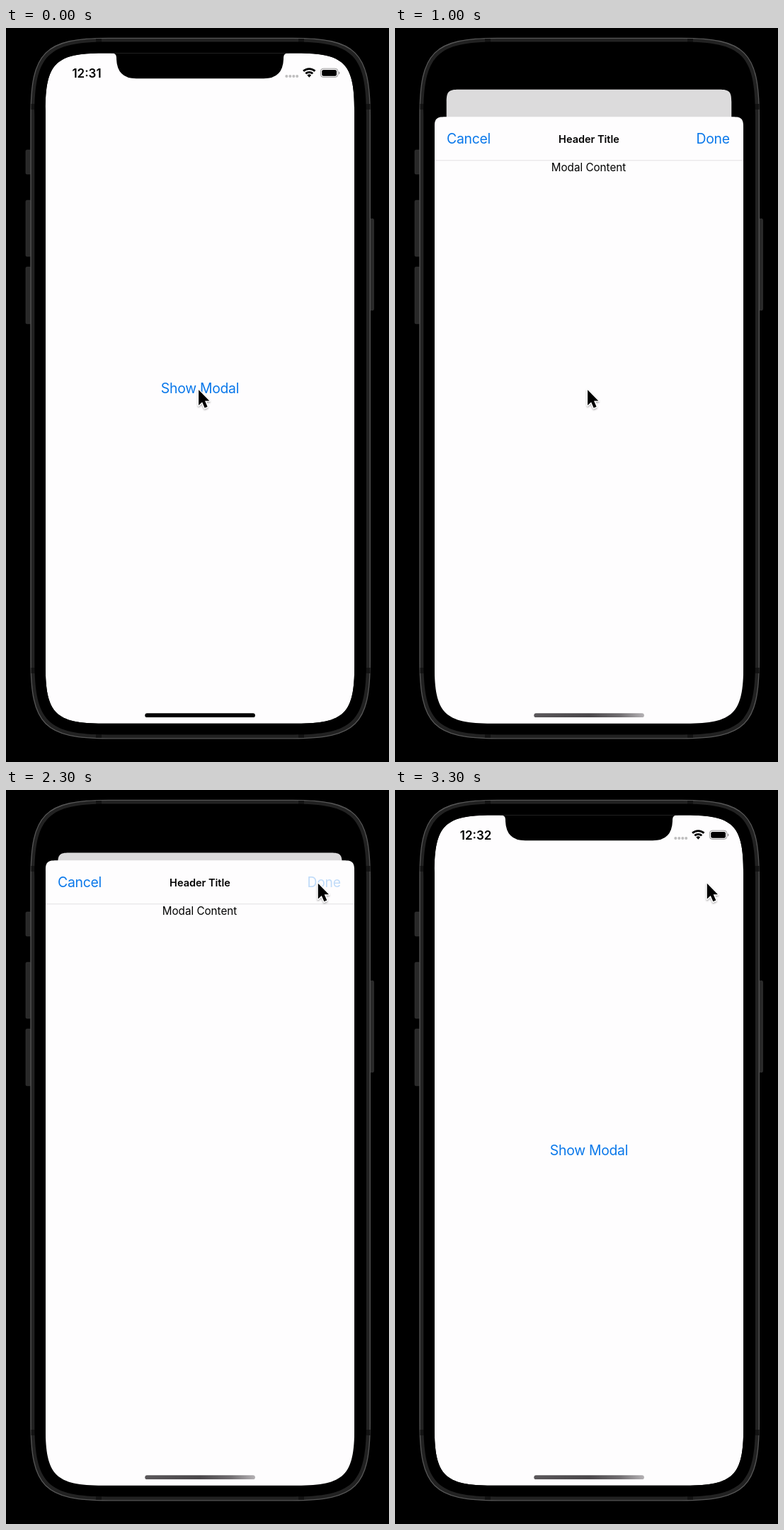
An HTML page for the animation above (3.4 s loop, 541 by 1035 pixels).

```html
<!DOCTYPE html>
<html lang="en">
<head>
<meta charset="utf-8">
<title>Modal sheet</title>
<style>
  html, body { margin: 0; width: 100%; height: 100%; overflow: hidden; background: #000; }
  svg { display: block; width: 100vw; height: 100vh; }
  text { font-family: Inter, "Liberation Sans", sans-serif; }
  .button { font-size: 19.4px; letter-spacing: -.28px; fill: #0a78ea; }
  .middle { text-anchor: middle; }
  .paper { fill: #fefdfe; }
  .arc { fill: none; stroke: #000; stroke-width: 2.9; }
</style>
</head>
<body>
<svg viewBox="0 0 541 1035">
  <defs>
    <clipPath id="glass"><path id="glassShape"/></clipPath>
    <linearGradient id="fade" x2="1" y2="0">
      <stop offset="0" stop-color="#5a575a"/>
      <stop offset=".5" stop-color="#4a474a"/>
      <stop offset=".78" stop-color="#706d70"/>
      <stop offset="1" stop-color="#b4b1b4"/>
    </linearGradient>
    <filter id="shadow" x="-50%" y="-50%" width="200%" height="200%">
      <feDropShadow dx="0" dy="1.5" stdDeviation="1.3" flood-opacity=".35"/>
    </filter>
  </defs>

  <g id="phone">
    <g fill="#292929" stroke="#3a3a3a" stroke-width=".6">
      <rect x="28" y="172" width="8" height="34" rx="1.5"/>
      <rect x="28" y="243" width="8" height="79" rx="1.5"/>
      <rect x="28" y="337" width="8" height="80" rx="1.5"/>
      <rect x="513" y="269" width="6.5" height="129" rx="1.5"/>
    </g>
    <path id="rim" fill="#222" stroke="#565656" stroke-width="1.3"/>
    <g fill="#131313">
      <rect x="35.5" y="107" width="479" height="8"/>
      <rect x="35.5" y="902" width="479" height="8"/>
      <rect x="127" y="15" width="8" height="986"/>
      <rect x="413" y="15" width="8" height="986"/>
    </g>
    <path id="bezel"/>
  </g>

  <g clip-path="url(#glass)">
    <g id="page">
      <path id="sheet" class="paper"/>
      <text id="show" class="button middle" x="274" y="515.4">Show Modal</text>
      <path id="dim"/>
    </g>

    <g id="status">
      <text id="clock" class="middle" x="114" y="69.6" font-size="17" font-weight="600"></text>
      <g fill-opacity=".25">
        <circle cx="396.3" cy="68" r="2"/><circle cx="401.3" cy="68" r="2"/>
        <circle cx="406.3" cy="68" r="2"/><circle cx="411.2" cy="68" r="2"/>
      </g>
      <g transform="translate(428.3 69.8)">
        <path d="M0 0L-2.9-3.2A4.3 4.3 0 0 1 2.9-3.2Z"/>
        <path class="arc" d="M-5-5.5A7.4 7.4 0 0 1 5-5.5"/>
        <path class="arc" d="M-8.2-9A12.2 12.2 0 0 1 8.2-9"/>
      </g>
      <rect x="444.4" y="57.2" width="24.4" height="12.2" rx="3.8" fill="none" stroke="#000" stroke-opacity=".4"/>
      <rect x="446.2" y="58.9" width="20.8" height="8.8" rx="2.3"/>
      <path d="M470 61.2Q472.8 63.3 470 65.4Z" fill-opacity=".45"/>
    </g>

    <path d="M148 30V35.5H150Q156 35.5 156 42V44Q157 71.3 184 71.3H364Q391 71.3 392 44V42Q392 35.5 398 35.5H400V30Z"/>

    <g id="modal">
      <path id="card" class="paper"/>
      <rect x="56" y="61" width="436" height="1" fill="#e2e0e3"/>
      <text class="button" x="73" y="38.2">Cancel</text>
      <text id="done" class="button" x="472.7" y="38.2" text-anchor="end">Done</text>
      <text class="middle" x="274" y="36.3" font-size="14.5" font-weight="600">Header Title</text>
      <text class="middle" x="273.5" y="77" font-size="15.2">Modal Content</text>
    </g>

    <rect id="home" x="196.3" y="966.3" width="155.6" height="5.8" rx="2.9"/>
  </g>

  <path id="cursor" d="M0 0V21.8L5 17.2L8.6 25.6L12.5 23.9L8.9 15.6H15.2Z"
        stroke="#fff" stroke-width="2.6" stroke-linejoin="round" paint-order="stroke" filter="url(#shadow)"/>
</svg>

<script>
const LOOP = 3400, STEP = 100;
const $ = id => document.getElementById(id);
const set = (id, name, value) => $(id).setAttribute(name, value);
const mix = (a, b, k) => a + (b - a) * k;

// Rectangle with continuous-curvature corners.
function squircle(x, y, w, h, r) {
  const s = r * 1.528, c = r * .27, m = s - c;
  return `M${x + s} ${y}h${w - 2 * s}c${m} 0 ${s} ${c} ${s} ${s}` +
    `v${h - 2 * s}c0 ${m} ${-c} ${s} ${-s} ${s}` +
    `h${2 * s - w}c${-m} 0 ${-s} ${-c} ${-s} ${-s}` +
    `v${2 * s - h}c0 ${-m} ${c} ${-s} ${s} ${-s}z`;
}

// Values held one step each, beginning at `start`; the ends hold.
function track(start, values, t) {
  const i = Math.floor((t - start) / STEP);
  return values[Math.max(0, Math.min(values.length - 1, i))];
}

const RISE = [0, .103, .424, .76, .912, .9705, .99, .998, 1];
const FALL = [1, .545, .15, .034, .01, .002, 0];
const openness = t => t < 2000 ? track(500, RISE, t) : track(2300, FALL, t);

set('rim', 'd', squircle(35, 14.3, 479.3, 987.5, 72));
set('bezel', 'd', squircle(40.3, 19.5, 468.7, 977, 68));
set('glassShape', 'd', squircle(55.8, 35.6, 436.4, 945.2, 53));
set('card', 'd', squircle(55.8, 0, 436.4, 1100, 10));

function draw(t) {
  const open = openness(t);

  const shape = squircle(55.8, 35.6, 436.4, 945.2, mix(53, 11, open));
  set('sheet', 'd', shape);
  set('dim', 'd', shape);
  set('dim', 'opacity', .136 * open);
  set('page', 'transform',
    `translate(274 ${508.2 + 15 * open}) scale(${1 - .08 * open}) translate(-274 -508.2)`);
  set('modal', 'transform', `translate(0 ${mix(981, 99.3, open)})`);
  set('modal', 'visibility', open > 0 ? 'visible' : 'hidden');

  set('show', 'opacity', track(300, [1, .6, .2, .2, .37, .7, 1], t));
  set('done', 'opacity', track(2100, [1, .6, .25, .2], t));
  set('home', 'fill', t < 600 ? '#000' : 'url(#fade)');
  $('clock').textContent = t < 1500 ? '12:31' : '12:32';

  const k = track(1500, [0, .2, .75, 1], t);
  set('cursor', 'transform', `translate(${mix(272.1, 440.8, k)} ${mix(510.2, 131.7, k)})`);
}

const begin = performance.now();
function tick() {
  draw((performance.now() - begin) % LOOP);
  requestAnimationFrame(tick);
}
tick();
</script>
</body>
</html>
```
